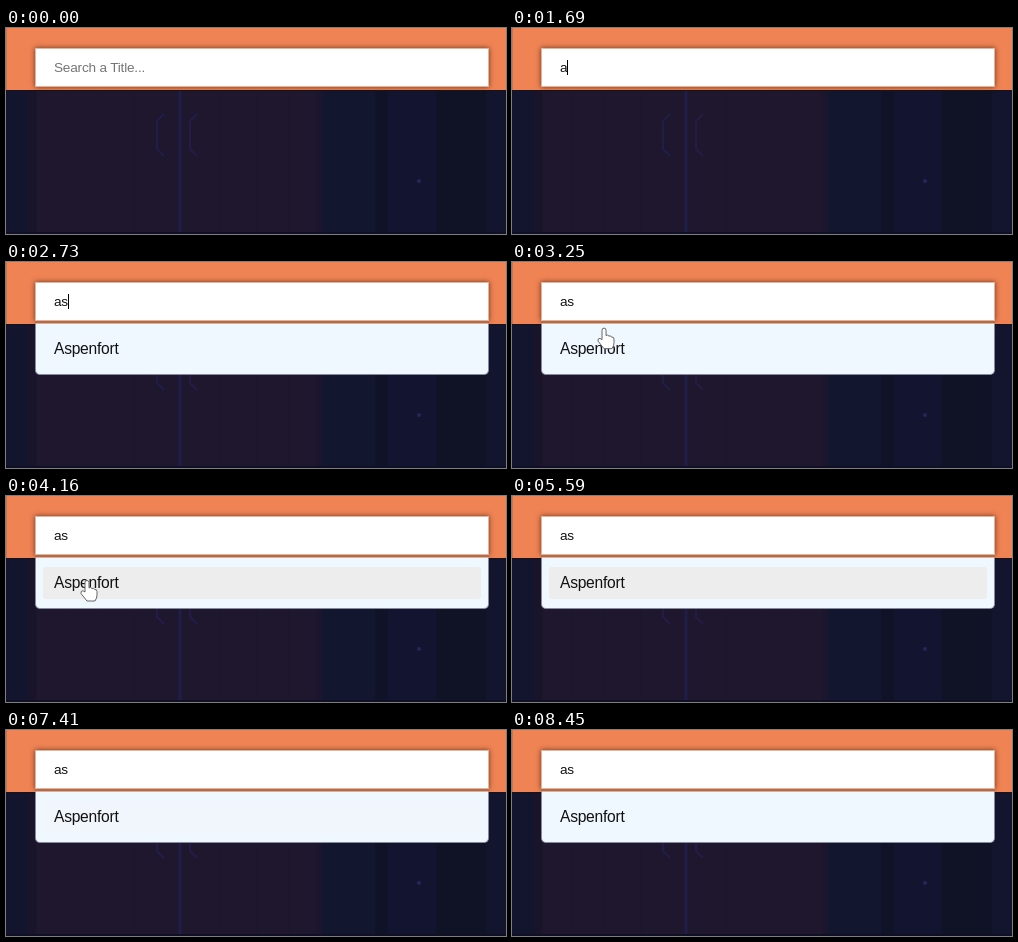
These frames come from a looping animation (500x206 px, 8580 ms). An HTML page:

```html
<!DOCTYPE html>
<html lang="en">
<head>
<meta charset="utf-8">
<title>Title search</title>
<style>
  html, body { margin: 0; width: 100%; height: 100%; overflow: hidden; background: #12132b; }
  #stage { position: relative; width: 500px; height: 206px; overflow: hidden;
    font-family: "Liberation Sans", Arial, sans-serif; color: #111; }
  #stage > * { position: absolute; box-sizing: border-box; }
  svg { left: 0; top: 0; }
  #bar { left: 0; top: 0; width: 500px; height: 62px; background: #ef8354;
    border-left: 1px solid #c87452; }
  #field { left: 29px; top: 20px; width: 454px; height: 39px; padding-left: 18px;
    background: #fff; border: 1px solid #dcb6a2; box-shadow: 0 0 5px rgba(50, 20, 0, .7);
    font-size: 13.6px; line-height: 38px; letter-spacing: -.2px; white-space: pre; }
  #caret { display: inline-block; width: 1px; height: 15px; margin: 0 -1px 0 0;
    background: #000; vertical-align: -3px; }
  #gap { left: 29px; top: 59px; width: 454px; height: 2px; background: #b96a43; }
  #hint { color: #757575; }
  #list { left: 29px; top: 61px; width: 454px; padding: 9px 7px;
    background: #f0f8ff; border: 1px solid #858a9c; border-top-color: #d4b1a1;
    border-radius: 0 0 5px 5px; }
  #list div { height: 32px; padding-left: 11px; border-radius: 3px;
    font-size: 15.6px; line-height: 32px; letter-spacing: -.25px; white-space: pre; }
</style>
</head>
<body>
<div id="stage">
  <svg id="room" width="500" height="206">
    <rect width="500" height="206" fill="#13142d"/>
    <rect x="22" y="62" width="8" height="144" fill="#1a142a"/>
    <rect x="30" y="62" width="280" height="144" fill="#1e172e"/>
    <rect x="310" y="62" width="6" height="144" fill="#1b162d"/>
    <path d="M30.5 62V206M60.5 62V206M92.5 62V206M128.5 62V206M214.5 62V206M250.5 62V206M282.5 62V206" stroke="#1c162c"/>
    <rect x="316" y="62" width="53" height="144" fill="#12162f"/>
    <rect x="369" y="62" width="13" height="144" fill="#101228"/>
    <rect x="382" y="62" width="48" height="144" fill="#13142f"/>
    <rect x="430" y="62" width="50" height="144" fill="#101225"/>
    <rect x="172.5" y="62" width="3" height="144" fill="#1f1e49"/>
    <path d="M158 86L151 93V121L158 128M191 86L184 93V121L191 128" fill="none" stroke="#201e47" stroke-width="2"/>
    <circle cx="413" cy="153" r="2" fill="#26265a"/>
    <rect y="204" width="500" height="2" fill="#0f1026"/>
    <rect y="62" width="500" height="1" fill="#1a1219"/>
  </svg>
  <div id="bar"></div>
  <div id="field"><span id="typed"></span><span id="caret"></span><span id="hint">Search a Title...</span></div>
  <div id="gap"></div>
  <div id="list">
    <div>Aspenfort</div>
    <div>Acorn Junction: Dew Headlands</div>
    <div>Axe of Farmers</div>
  </div>
  <svg width="500" height="206">
    <g id="pointer" stroke-linejoin="round">
      <path id="arrow" d="M0 0V15L3.5 12L6 17.5L8.5 16.5L6 11H11Z" fill="#fff" stroke="#333"/>
      <path id="beam" d="M-3 -8H3M0 -8V8M-3 8H3" fill="none" stroke="#333"/>
      <path id="hand" d="M-2 11V1.5Q-2 -.5 0 -.5T2 1.5V7Q3.5 5.5 5 7.5Q7 6.5 7.5 8.5Q10 8 10 10.5V14Q10 17 8 20H0L-6 12.5Q-6.5 9.5 -4 9.8Z" fill="#fff" stroke="#666"/>
    </g>
  </svg>
</div>
<script>
const LOOP = 8580, STEP = 130;
const blinks = [910, 1560, 1690, 2210, 2600, 3120, 3640, 4160, 4810, 5330,
  5850, 6370, 6890, 7410, 8060, 8450];
const ui = Object.fromEntries(
  ["typed", "caret", "hint", "gap", "list", "pointer", "arrow", "beam", "hand"]
    .map(id => [id, document.getElementById(id)]));
const rows = [...ui.list.children];
const clamp = v => Math.max(0, Math.min(1, v));
const show = (node, on) => { node.style.display = on ? "" : "none"; };

function drawPointer(t) {
  show(ui.pointer, t >= 2860 && t < 5590);
  const left = (1 - clamp((t - 2730) / 910)) ** 2;
  const x = 81 + 60 * left, y = 85 - 100 * left;
  ui.pointer.setAttribute("transform", `translate(${x} ${y})`);
  show(ui.arrow, y < 21);
  show(ui.beam, y >= 21 && y < 60);
  show(ui.hand, y >= 60);
}

function draw(now) {
  const t = Math.floor(now % LOOP / STEP) * STEP;
  ui.typed.textContent = t < 1690 ? "" : t < 2600 ? "a" : "as";
  show(ui.hint, t < 1690);
  const lit = blinks.filter(b => b <= t).length % 2;
  ui.caret.style.visibility = lit ? "visible" : "hidden";

  show(ui.list, t >= 1820);
  show(ui.gap, t >= 1820);
  rows.forEach((row, i) => show(row, i === 0 || t < 2730));
  const hover = Math.min(clamp((t - 3250) / 390), clamp((7540 - t) / 520));
  rows[0].style.background = `rgba(237,237,237,${hover})`;
  drawPointer(t);
}

function frame() {
  draw(performance.now());
  requestAnimationFrame(frame);
}
frame();
</script>
</body>
</html>
```
